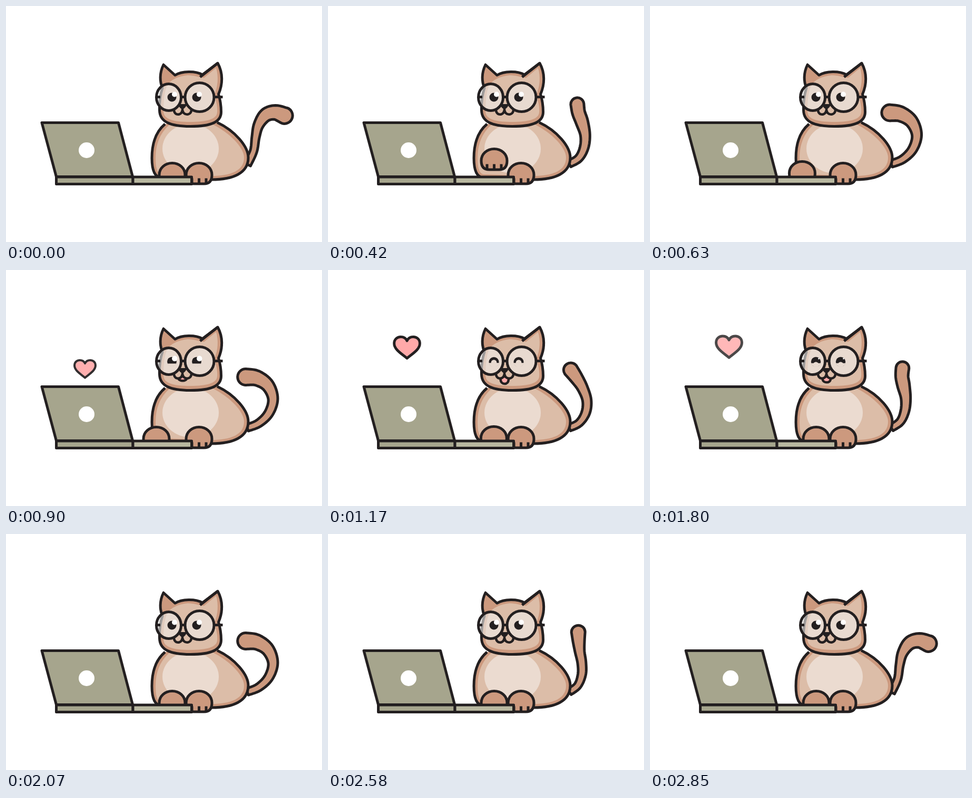
Animation, 600 px wide and 450 px high, one loop 3.6 s. Source, as an HTML page:

```html
<!DOCTYPE html>
<html lang="en">
<head>
<meta charset="utf-8">
<title>Cat at a laptop</title>
<style>
  html, body { margin: 0; width: 100%; height: 100%; overflow: hidden; background: #fff; }
  svg { display: block; width: 600px; height: 450px; }
  .line { stroke: #231f20; stroke-width: 5; stroke-linejoin: round; fill: none; }
  .fine { stroke-width: 4.5; }
  .fur { fill: #cc997e; }
  .light { fill: #dcbda8; }
  .lens { fill: #f0eeeb; fill-opacity: .6; }
  .ink { fill: #231f20; }
  .cover { fill: #e8dad0; }
  .metal { fill: #a6a58d; }
  .deck { fill: #b9b8a0; }
  .pink { fill: #ffa9a9; }
</style>
</head>
<body>
<svg viewBox="0 0 600 450">
  <defs>
    <g id="paw">
      <path class="line fur" d="M-24.5 322C-24.5 309-13.5 299.500 0 299.500S24.500 309 24.500 322C24.500 333 19.500 339 9.500 339H-9.500C-19.500 339-24.500 333-24.500 322Z"/>
      <path class="line" d="M-13.500 328.500V338M0 328.500V338M13.500 328.500V338"/>
    </g>
    <clipPath id="round"><circle r="8.800"/></clipPath>
  </defs>

  <path id="tail" class="line fur"/>

  <g id="body">
    <path class="fur" d="M302 225C284 240 277 264 277 290C277 310 281 326 294 327L390 331C431 331 460 319 460 289C460 268 435 238 401 222Z"/>
    <path class="light" d="M312 225C292 242 284 264 284 290C284 308 287 320 296 321L390 324C427 324 452 314 452 289C452 272 429 244 391 225Z"/>
    <ellipse cx="350.500" cy="272" rx="53.500" ry="47" fill="#ebdbd0"/>
    <path class="line" d="M302 225C284 240 277 264 277 290C277 310 281 326 294 327L390 331C431 331 460 319 460 289C460 268 435 238 401 222"/>
  </g>

  <g id="head">
    <path class="line fur" d="M321 132L299 112C291 128 292 145 297 156C292 172 291 185 291.500 199C292 221 312 229.500 350 229.500C390 229.500 408.500 221 408.500 202C408.500 190 406.500 178 403.500 168C411.500 150 412.500 128 402 109L373 131C360 123.500 334 123.500 321 132Z"/>
    <path class="light" d="M345 132C358 132 366 136 376 137L399 118C404 135 402 155 396 168C400 185 402 195 401 203C400 216 380 221 350 221C318 221 300 216 299 202C299 180 301 160 307 150C313 141 325 134 345 132Z"/>
    <path class="line" d="M402 109L368.500 135.500"/>
    <path id="mouth" class="line fine pink"/>
    <path class="line fine light" d="M319 197C318 210 335 210 335 197C335 210 353 210 352 197"/>
    <path class="ink" d="M327 187H343C343 191 339 195 335 198C331 195 327 191 327 187Z"/>
    <ellipse class="line lens" cx="309" cy="174" rx="23.500" ry="25.500"/>
    <circle class="line lens" cx="367.500" cy="174" r="27.500"/>
    <path class="line" d="M286 173.500H293M331 173.500H341M395 173.500H411.500"/>
    <g id="eyes"></g>
  </g>

  <use id="hand" href="#paw" x="315.500"/>
  <use href="#paw" x="366.500"/>

  <path id="heart" class="line pink" d="M0 20.500C-10 12-24.500 4-24.500-8C-24.500-16-18.500-20.500-12-20.500C-6-20.500-2-17.500 0-13C2-17.500 6-20.500 12-20.500C18.500-20.500 24.500-16 24.500-8C24.500 4 10 12 0 20.500Z"/>

  <g id="laptop">
    <path class="line metal" d="M68 222.500H213.500L240.500 325.500H95.500Z"/>
    <path class="line metal" d="M95.500 326H241V339.500H95.500Z"/>
    <path class="line deck" d="M241 326H352.500V339.500H241Z"/>
    <circle cx="153" cy="275" r="15" fill="#fff"/>
  </g>
</svg>

<script>
const LOOP = 3600;
const el = id => document.getElementById(id);
const [tail, mouth, eyes, hand, heart] = ['tail', 'mouth', 'eyes', 'hand', 'heart'].map(el);

const span = (t, a, b) => Math.min(1, Math.max(0, (t - a) / (b - a)));
const ease = u => (1 - Math.cos(Math.PI * u)) / 2;
const easeOut = u => u * (2 - u);

// Tail poses from base to tip: x, y, half width
const RIGHT = [[458,302,7], [470,277,6.5], [474,250,7.2], [479.5,227,9], [493,208,12], [511,203,13.5], [529,209,15.5]];
const LEFT = [[458,301,6.5], [480,292,7], [499,273,8], [507,246,9], [497,220,11.5], [476,206,14], [455,204,15.5]];
const UP_TO_LEFT = [[458,301,6.5], [476,290,7], [486,270,8], [488,246,9], [482,221,11.5], [476,203,12], [474,187,12.5]];
const UP_TO_RIGHT = [[458,301,6.5], [474,289,6.5], [482,268,7.5], [482,246,8], [478,224,9], [476,205,11], [475,187,13]];

// Parabolic blend through a, m (at u = k) and b
function blend(a, m, b, u, k) {
  const wa = (u - k) * (u - 1) / k;
  const wm = u * (u - 1) / (k * (k - 1));
  const wb = u * (u - k) / (1 - k);
  return a.map((p, i) => p.map((v, j) => wa * v + wm * m[i][j] + wb * b[i][j]));
}

function tailPose(t) {
  const toLeft = s => blend(RIGHT, UP_TO_LEFT, LEFT, ease(span(t, s, s + 540)), .58);
  const toRight = s => blend(LEFT, UP_TO_RIGHT, RIGHT, ease(span(t, s, s + 540)), .5);
  if (t < 990) return toLeft(120);
  if (t < 1530) return toRight(990);
  if (t < 2310) return toLeft(1530);
  return toRight(2310);
}

// Catmull-Rom sample
function sample(pts, s) {
  const i = Math.min(pts.length - 2, Math.floor(s)), f = s - i;
  const at = n => pts[Math.min(pts.length - 1, Math.max(0, n))];
  const [a, b, c, d] = [at(i - 1), at(i), at(i + 1), at(i + 2)];
  return b.map((v, j) => v + f / 2 * (c[j] - a[j]
    + f * (2 * a[j] - 5 * v + 4 * c[j] - d[j]
    + f * (3 * (v - c[j]) + d[j] - a[j]))));
}

function tailPath(pts) {
  const steps = 48, last = pts.length - 1, one = [], two = [];
  for (let n = 0; n <= steps; n++) {
    const s = n / steps * last;
    const [x, y, r] = sample(pts, s);
    const p = sample(pts, Math.max(0, s - .05)), q = sample(pts, Math.min(last, s + .05));
    const dx = q[0] - p[0], dy = q[1] - p[1], k = r / Math.hypot(dx, dy);
    const point = side => (x + side * dy * k).toFixed(2) + ' ' + (y - side * dx * k).toFixed(2);
    one.push(point(-1));
    two.unshift(point(1));
  }
  const r = pts[last][2];
  return `M${one.join('L')}A${r} ${r} 0 0 0 ${two.join('L')}Z`;
}

// Pupil, highlight and the lower lid that turns it into an arch
eyes.innerHTML = [315, 362].map(x => `<g transform="translate(${x} 174)"><g class="eye">
  <circle class="ink" r="8.500"/><circle class="shine" cx="5" cy="-5.500" r="5" fill="#fff"/>
  <g clip-path="url(#round)"><rect class="cover lid" x="-10" width="20" height="11"/>
  <circle class="cover cheek" r="4.800"/></g></g></g>`).join('');
const each = (cls, fn) => eyes.querySelectorAll('.' + cls).forEach(fn);

function drawFace(t) {
  const h = easeOut(span(t, 750, 1050)) * (1 - ease(span(t, 1740, 2040)));
  const bend = h ** 3, shine = 5 * (1 - span(h, .76, .95));
  each('eye', e => e.setAttribute('transform', `translate(0 ${1.5 * bend}) scale(${1 + .12 * bend})`));
  each('shine', e => e.setAttribute('r', shine));
  each('lid', e => e.setAttribute('y', 10 - 8.5 * h));
  each('cheek', e => e.setAttribute('cy', 16 - 15 * bend));
  const low = 207 + 10 * bend;
  mouth.setAttribute('d', `M327.500 203V207C327.500 ${low - 2} 332 ${low} 335.500 ${low}S343 ${low - 2} 343 207V203Z`);
  mouth.style.opacity = span(h, 0, .2);
}

function drawHand(t) {
  const up = ease(span(t, 120, 420)), down = ease(span(t, 420, 690)), back = ease(span(t, 900, 1200));
  const x = -30 * (down - back);
  const y = -27 * (up - down) - 14 * Math.sin(Math.PI * back);
  hand.setAttribute('transform', `translate(${x} ${y})`);
}

function drawHeart(t) {
  const u = span(t, 690, 1230), p = easeOut(u);
  heart.setAttribute('transform', `translate(150 ${260 - 113.5 * p}) scale(${.5 + .5 * p})`);
  heart.style.opacity = Math.min(1, u / .42) * (1 - span(t, 1740, 2070));
}

function draw(now) {
  const t = (now - start) % LOOP;
  tail.setAttribute('d', tailPath(tailPose(t)));
  drawFace(t);
  drawHand(t);
  drawHeart(t);
}

const start = performance.now();
draw(start);
(function tick() {
  draw(performance.now());
  requestAnimationFrame(tick);
})();
</script>
</body>
</html>
```
